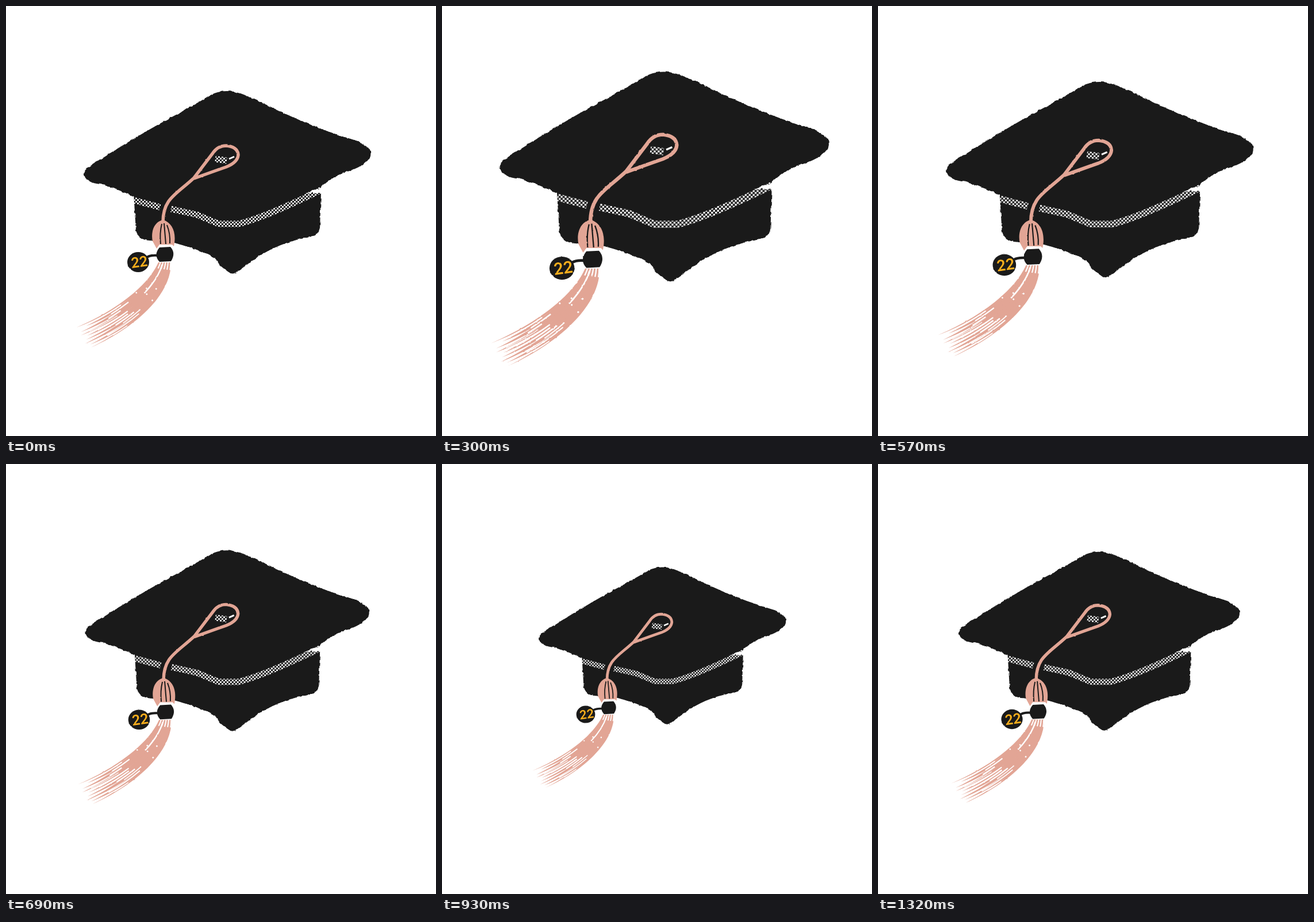
Animation of 748x748 px, one loop 1350 ms. Source, as an HTML page:

```html
<!DOCTYPE html>
<html lang="en">
<head>
<meta charset="utf-8">
<title>Graduation cap</title>
<style>
  html, body { margin: 0; height: 100%; overflow: hidden; background: #fff; }
  svg { display: block; width: 100%; height: 100%; fill: none; }
</style>
</head>
<body>
<svg viewBox="0 0 748 748">
  <defs>
    <filter id="rough" filterUnits="userSpaceOnUse" x="0" y="0" width="748" height="748" color-interpolation-filters="sRGB">
      <feTurbulence type="fractalNoise" baseFrequency=".13" numOctaves="2" seed="4"/>
      <feDisplacementMap in="SourceGraphic" scale="4" xChannelSelector="R" yChannelSelector="G"/>
    </filter>
    <filter id="grain" filterUnits="userSpaceOnUse" x="0" y="0" width="748" height="748" color-interpolation-filters="sRGB">
      <feTurbulence type="fractalNoise" baseFrequency=".2" seed="2"/>
      <feDisplacementMap in="SourceGraphic" scale="2" xChannelSelector="R" yChannelSelector="G"/>
    </filter>
    <pattern id="dots" width="6" height="6" patternUnits="userSpaceOnUse">
      <path d="M1.5 1.5h0M4.5 4.5h0" stroke="#fff" stroke-width="3.2" stroke-linecap="round"/>
    </pattern>
  </defs>
  <g id="cap">
    <g filter="url(#rough)" fill="#1a1a1a">
      <path d="M362 152Q384 144 408 152C460 172 505 203 612 235Q640 247 633 263Q627 276 600 286Q565 297 548 316L386 372L222 331Q190 317 165 310Q140 308 135 293Q134 284 160 269Q250 213 300 187Z"/>
      <path d="M222 325H548L546 386Q542 401 528 402Q470 412 426 445L400 464Q393 468 386 462Q372 452 370 448Q364 434 320 420T288 413L250 408Q230 407 226 390Z"/>
    </g>
    <g stroke="url(#dots)" stroke-width="11">
      <path d="M223 338L268 350M287 353L332 363L370 379H405Q450 368 548 320"/>
      <path d="M364 266L384 269"/>
    </g>
    <path d="M388 266L397 262" stroke="#fff" stroke-width="3"/>
    <g filter="url(#grain)">
      <g id="tail"></g>
      <path stroke="#e2a595" stroke-width="5.5" d="M273 376C273 335 296 328 327 299L359 257Q368 243 383 243Q403 245 404 259Q403 272 383 280Q360 288 327 300"/>
      <path fill="#e2a595" d="M273 372C256 376 252 395 255 409L262 422L267 415H289L292 418C297 395 290 377 273 372Z"/>
      <path stroke="#1a1a1a" stroke-width="2" d="M271 379Q267 395 269 414M275 378L278 414M280 381Q286 396 285 413"/>
      <path fill="#1a1a1a" d="M267 420L286 419Q296 430 287 444L267 445Q256 433 267 420Z"/>
      <path stroke="#1a1a1a" stroke-width="4" d="M245 437Q252 433 264 434"/>
      <ellipse cx="230" cy="445.5" rx="19" ry="17.5" fill="#1a1a1a"/>
      <text x="232" y="454" transform="rotate(-8 232 446)" text-anchor="middle" font-family="Lato, sans-serif" font-weight="700" font-size="25" fill="#fbb01c">22</text>
    </g>
  </g>
</svg>
<script>
  const cap = document.getElementById('cap');
  const tail = document.getElementById('tail');

  let seed = 7;
  const random = (min, max) => {
    seed = seed * 16807 % 2147483647;
    return min + (max - min) * seed / 2147483647;
  };

  // Tail fibres blend between the left (u = 0) and right (u = 1) edge curves.
  const left = [265, 446, 248, 485, 195, 528, 125, 558];
  const right = [287, 446, 288, 505, 220, 562, 138, 599];
  const fibre = u => left.map((a, i) => a + (right[i] - a) * u);

  function addPath(attrs) {
    const path = document.createElementNS('http://www.w3.org/2000/svg', 'path');
    for (const name in attrs) path.setAttribute(name, attrs[name]);
    tail.append(path);
  }

  // A strand keeps its width along the tail and narrows to a point.
  function strand(u, half) {
    const a = fibre(Math.max(0, u - half)), b = fibre(Math.min(1, u + half));
    const [tipX, tipY] = fibre(u).slice(6);
    const shorten = random(-3, 14);
    addPath({
      fill: '#e2a595',
      d: `M${a.slice(0, 2)}C${[...a.slice(2, 6), tipX + shorten, tipY - shorten / 2,
        ...b.slice(4, 6), ...b.slice(2, 4), ...b.slice(0, 2)]}Z`
    });
  }

  function streak(u, from, length, width) {
    const p = fibre(u);
    addPath({
      d: `M${p.slice(0, 2)}C${p.slice(2)}`, pathLength: 1, stroke: '#fff',
      'stroke-width': width, 'stroke-dasharray': `0 ${from} ${length} 2`
    });
  }

  const STRANDS = 9, STREAKS = 10;
  for (let i = 0; i < STRANDS; i++) strand(i / (STRANDS - 1), 0.09);
  for (let i = 0; i < STREAKS; i++) {
    const u = (i + 0.7) / STREAKS;
    streak(u, random(0.42, 0.65), random(0.12, 0.32), random(1, 2.5));
    if (i % 2) streak(u, 0, 0.06, 2);
    else streak(u, random(0.15, 0.4), 0.012, 2.5);
  }
  streak(0.35, 0.02, 0.3, 2.5);

  const LOOP = 1350, STEP = 30;
  function draw() {
    const time = Math.floor(performance.now() % LOOP / STEP) * STEP;
    const scale = 1 + 0.15 * Math.sin(2 * Math.PI * time / LOOP);
    cap.setAttribute('transform', `translate(374 374) scale(${scale}) translate(-374 -374)`);
    requestAnimationFrame(draw);
  }
  draw();
</script>
</body>
</html>
```
